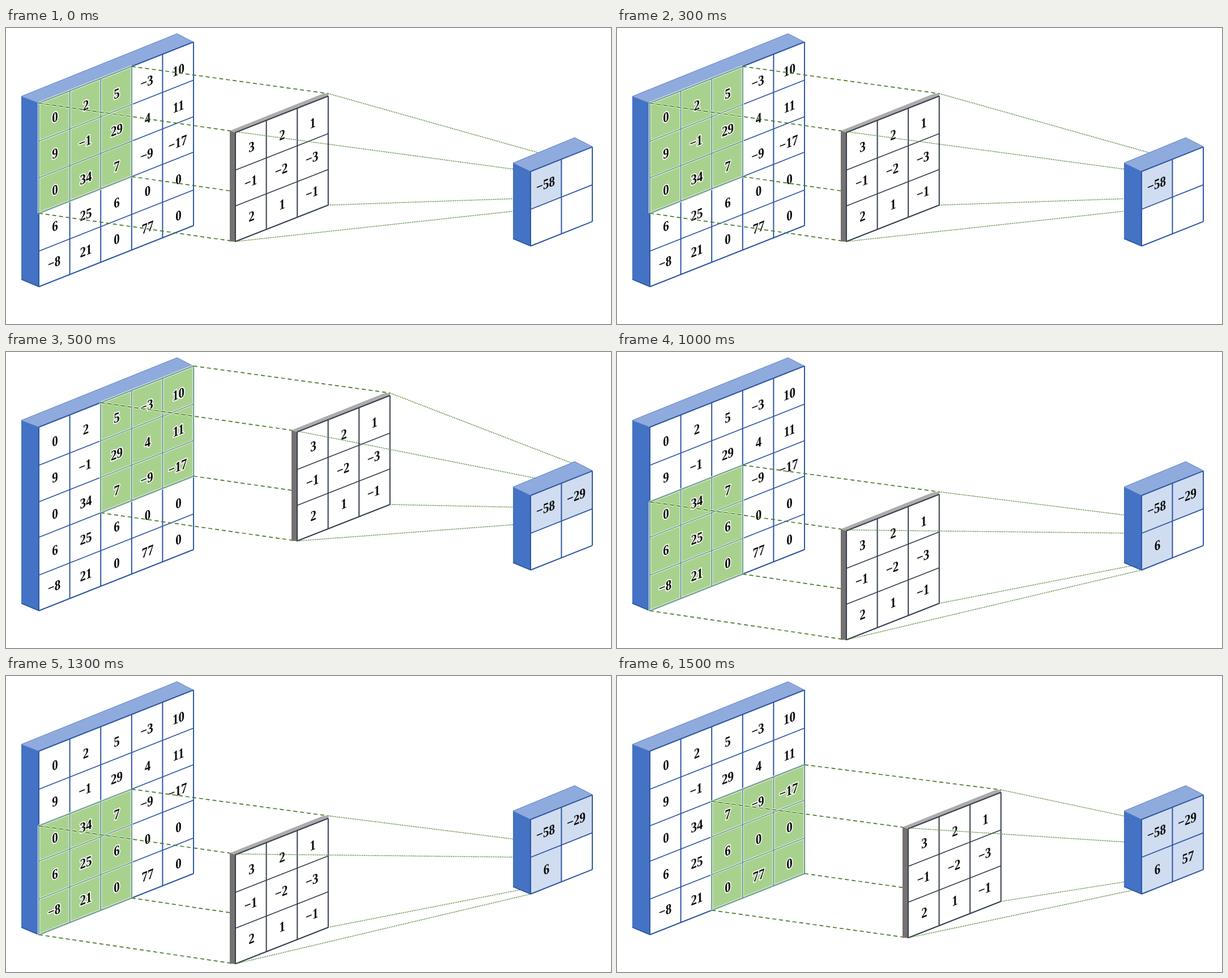
These frames come from a looping animation (1068x524 px, 2000 ms). An HTML page with a canvas:

```html
<!DOCTYPE html>
<html lang="en">
<head>
<meta charset="utf-8">
<title>Convolution</title>
<style>
html, body { margin: 0; width: 100%; height: 100%; overflow: hidden; background: #fff; }
canvas { display: block; }
</style>
</head>
<body>
<canvas id="stage" width="1068" height="524"></canvas>
<script>
const ctx = document.getElementById('stage').getContext('2d');
const STEP_MS = 500;
const BLUE = '#2f5597', DARK = '#333f50', GREEN = '#a9d18e', DASH = '#447c22';
const CELL_W = 54.6, CELL_H = 65, RISE = 21.6;

const input = [
  [0, 2, 5, -3, 10],
  [9, -1, 29, 4, 11],
  [0, 34, 7, -9, -17],
  [6, 25, 6, 0, 0],
  [-8, 21, 0, 77, 0]
];
const kernel = [[3, 2, 1], [-1, -2, -3], [2, 1, -1]];
const output = [[-58, -29], [6, 57]];
const kernelShift = [[0, 0], [109, -43.5], [0, 131.5], [109, 85.5]];

// Slanted grids: each row boundary is an offset down the left edge.
const bigGrid = { x: 58, y: 133, rows: [0, 67.5, 132.3, 195, 262, 325], cols: 5, w: 54.6, rise: 21.65 };
const smallGrid = { x: 405, y: 185, rows: [0, 66.5, 130, 193], cols: 3, w: 54.6, rise: 21.5 };
const outGrid = { x: 926, y: 254, rows: [0, 67, 132], cols: 2, w: 54.5, rise: 21.7 };

const corner = (g, c, r) => [g.x + c * g.w, g.y + g.rows[r] - c * g.rise];

function trace(points, closed = true) {
  ctx.beginPath();
  points.forEach(p => ctx.lineTo(...p));
  if (closed) ctx.closePath();
}

function fill(points, color) {
  trace(points);
  ctx.fillStyle = color;
  ctx.fill();
}

function line(a, b, color, width, dash = []) {
  trace([a, b], false);
  ctx.strokeStyle = color;
  ctx.lineWidth = width;
  ctx.setLineDash(dash);
  ctx.stroke();
  ctx.setLineDash([]);
}

const block = (g, c, r, nc, nr) => [
  corner(g, c, r), corner(g, c + nc, r), corner(g, c + nc, r + nr), corner(g, c, r + nr)
];

function rule(g, color, width, c = 0, r = 0, nc = g.cols, nr = g.rows.length - 1) {
  for (let i = 0; i <= nr; i++) {
    const edge = i === 0 || i === nr;
    line(corner(g, c, r + i), corner(g, c + nc, r + i), color, edge ? width : width * 0.85);
  }
  for (let i = 0; i <= nc; i++) line(corner(g, c + i, r), corner(g, c + i, r + nr), color, width);
}

function number(value, x, y, halo = false) {
  const text = String(value).replace('-', '\u2212');
  ctx.save();
  ctx.transform(CELL_W / CELL_H, -RISE / CELL_H, 0, 1, x - (value < 0 ? 1.5 : 0), y);
  ctx.font = 'bold 25px "Liberation Serif", "Times New Roman", serif';
  ctx.textAlign = 'center';
  if (halo) {
    ctx.strokeStyle = 'rgba(255,255,255,0.9)';
    ctx.lineWidth = 4;
    ctx.lineJoin = 'round';
    ctx.strokeText(text, 0, 8.5);
  }
  ctx.fillStyle = '#0a0a0a';
  ctx.fillText(text, 0, 8.5);
  ctx.restore();
}

function drawInput(col, row) {
  const g = bigGrid;
  fill([[27, 121], [302, 10], [331, 25], [58, 133]], '#8faadc');
  fill([[27, 121], [58, 133], [58, 458], [27, 445]], '#4472c4');
  trace([[58, 133], [27, 121], [302, 10], [331, 25]], false);
  ctx.strokeStyle = '#6286cb';
  ctx.lineWidth = 1;
  ctx.stroke();
  line([27, 445], [58, 458], BLUE, 1.5);
  fill(block(g, 0, 0, 5, 5), '#fff');
  rule(g, '#2d56a3', 2);
  fill(block(g, col, row, 3, 3), GREEN);
  rule(g, '#e9f3e4', 4.2, col, row, 3, 3);
  rule(g, '#6d9b94', 2, col, row, 3, 3);
  input.forEach((values, r) => values.forEach((v, c) => {
    const inside = c >= col && c < col + 3 && r >= row && r < row + 3;
    number(v, 86.5 + 54.5 * c, 157.3 + 64.4 * r - 20.8 * c, inside);
  }));
}

function drawKernel(g) {
  const { x, y } = g;
  fill([[x - 10, y - 3], [x + 155, y - 69], [x + 164, y - 69], [x + 164, y - 64], [x, y]], '#aeabab');
  fill([[x - 10, y - 3], [x, y], [x, y + 193], [x - 10, y + 193]], '#767171');
  fill(block(g, 0, 0, 3, 3), '#fff');
  rule(g, DARK, 2);
  kernel.forEach((values, r) => values.forEach((v, c) =>
    number(v, x + 28.5 + 54 * c, y + 25 + 61.5 * r - 21 * c)));
}

function drawOutput(step) {
  const g = outGrid;
  fill([[895, 239], [1004, 194], [1035, 210], [926, 254]], '#8faadc');
  fill([[895, 239], [926, 254], [926, 386], [895, 373]], '#4472c4');
  trace([[926, 254], [895, 239], [1004, 194], [1035, 210]], false);
  ctx.strokeStyle = '#5c82c9';
  ctx.lineWidth = 1;
  ctx.stroke();
  line([895, 373], [926, 386], BLUE, 1.5);
  fill(block(g, 0, 0, 2, 2), '#fff');
  for (let i = 0; i <= step; i++) fill(block(g, i % 2, i >> 1, 1, 1), '#d0dcf0');
  rule(g, '#2d56a3', 2);
  for (let i = 0; i <= step; i++) {
    const c = i % 2, r = i >> 1;
    number(output[r][c], 954 + 54 * c, 276 + 66 * r - 21.5 * c);
  }
}

function draw(step) {
  const c = step % 2, r = step >> 1;
  const col = c * 2, row = r * 2;
  const [dx, dy] = kernelShift[step];
  const k = { ...smallGrid, x: smallGrid.x + dx, y: smallGrid.y + dy };

  ctx.fillStyle = '#fff';
  ctx.fillRect(0, 0, 1068, 524);
  drawInput(col, row);

  const from = block(bigGrid, col, row, 3, 3);
  const via = block(k, 0, 0, 3, 3);
  via[0][1] -= 1.5;
  via[1][1] -= 4.5;
  const to = block(outGrid, c, r, 1, 1);
  const dash = [7, 5];

  ctx.save();
  trace(from);
  ctx.clip();
  from.forEach((p, i) => line(p, via[i], 'rgba(255,255,255,0.75)', 4, dash));
  ctx.restore();
  from.forEach((p, i) => line(p, via[i], DASH, 1.7, dash));

  drawKernel(k);
  via.forEach((p, i) => line(p, to[i], DASH, 1.6, [1.6, 1.6]));
  drawOutput(step);
}

function frame() {
  draw(Math.floor(performance.now() / STEP_MS) % 4);
  requestAnimationFrame(frame);
}
frame();
</script>
</body>
</html>
```
